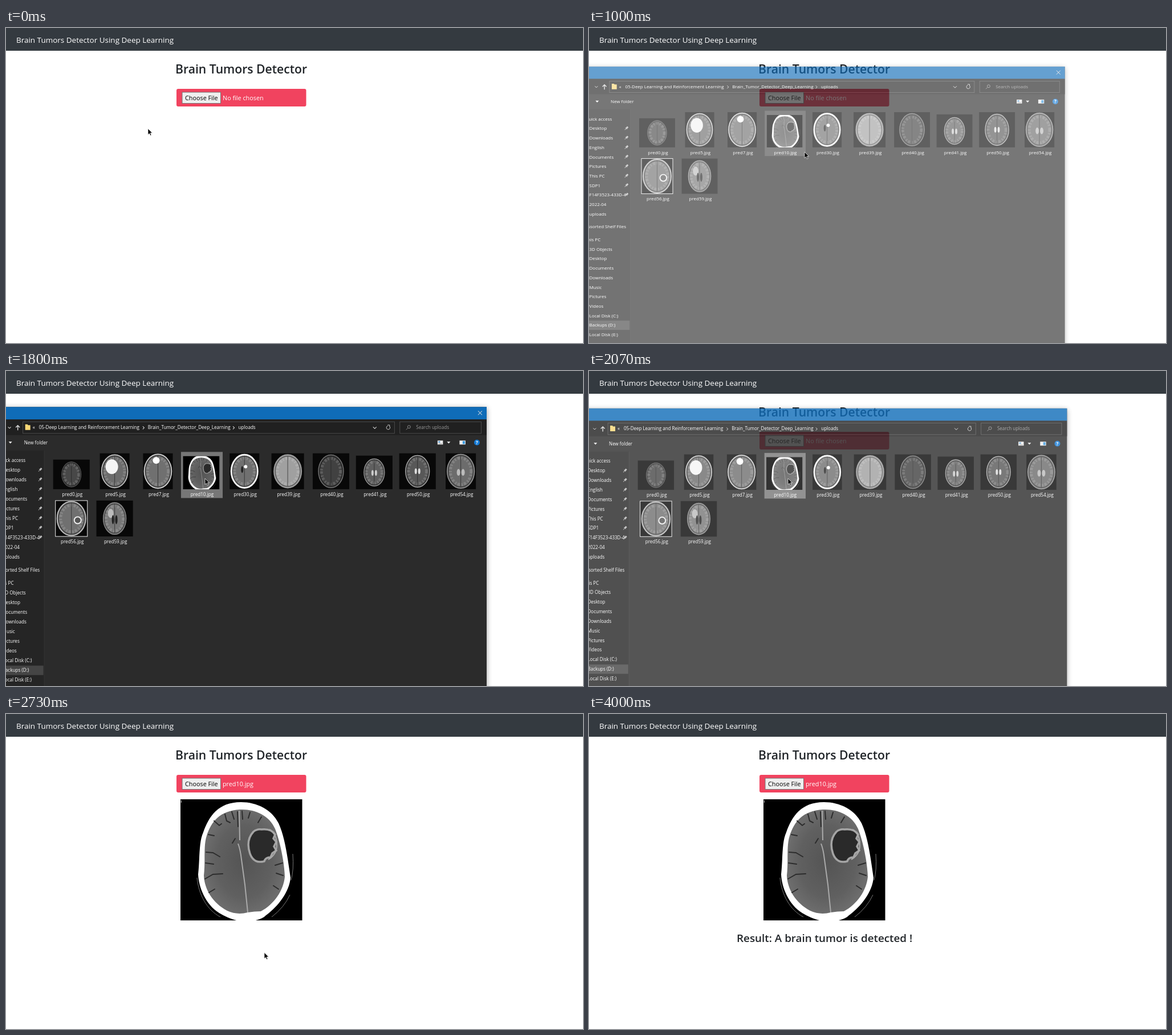
Recreate the animation shown at these times as an HTML page. Size 1012 px wide and 554 px high, loop 4.47 s.

```html
<!DOCTYPE html>
<html lang="en">
<head>
<meta charset="utf-8">
<title>Brain Tumors Detector</title>
<style>
html, body { margin: 0; width: 100%; height: 100%; overflow: hidden; background: #fff; }
svg { display: block; width: 100%; height: 100%; font-family: "Open Sans", "Noto Sans", sans-serif; }
#dialog { font-size: 8.1px; fill: #fff; filter: drop-shadow(0 2px 5px #0006); }
.line { fill: none; stroke: #ddd; }
</style>
</head>
<body>
<svg id="stage" viewBox="0 0 1012 554">
  <defs>
    <radialGradient id="tissue">
      <stop offset="0" stop-color="#545454"/>
      <stop offset=".7" stop-color="#606060"/>
      <stop offset="1" stop-color="#6c6c6c"/>
    </radialGradient>
    <symbol id="scan" viewBox="306 150 213.5 213" preserveAspectRatio="xMidYMid slice">
      <path fill="#000" d="M306 150h214v213H306z"/>
      <path class="line" style="stroke:#777" d="M335 288C338 318 352 344 376 357M503 246Q505 275 500 292M498 318Q488 340 466 357"/>
      <path fill="#fff" d="M412 155C440 155 466 168 478 192C490 218 494 255 499 288C497 312 478 338 456 354Q448 363 420 366Q395 363 374 350C350 335 338 305 337 282C340 255 338 225 346 208C356 180 372 155 412 155Z"/>
      <path fill="url(#tissue)" d="M411 168C436 167 462 178 472 202C482 228 488 262 489 286C487 310 470 335 447 347Q436 347 424 349Q405 354 388 346C362 332 348 308 347 284C350 258 346 232 352 214C360 190 374 170 411 168Z"/>
      <path fill="none" stroke="#2c2c2c" stroke-width="2" stroke-linecap="round" d="M365 188l9 8 4-3M384 176l3 12 6 3M396 172l4 13M406 172l1 26M414 171l1 14M428 173l-3 10M448 181l-6 10M355 212l10 2M351 243l12 1 12 7M350 262l14 2M349 290l14-8 17-1M356 314l10-6M485 262l-13 4M486 284l-12-4M478 308l-9-6M402 219l-5 8"/>
      <path fill="none" stroke="#aaa" stroke-width="2" d="M409 170L410 222M407 228Q411 238 413 256L419 300 424 349"/>
      <path fill="#2a2a2a" stroke="#a4a4a4" stroke-width="3.5" d="M448 203Q465 201 472 212L469 219 474 225 470 233 474 240 467 245 464 252Q455 252 453 259Q435 264 428 246Q420 222 434 207Q440 202 448 203Z"/>
      <path fill="none" stroke="#aaa" stroke-width="2" d="M462 203Q475 210 475 231Q475 247 460 256"/>
      <path fill="#bbb" d="M307 152h1v4h-1z"/>
    </symbol>
  </defs>

  <path fill="#343a40" d="M0 0H1012V40H0z"/>
  <text x="18" y="25.5" font-size="13.47" fill="#fff">Brain Tumors Detector Using Deep Learning</text>
  <text x="297" y="79.5" font-size="21.15" font-weight="600" fill="#212529">Brain Tumors Detector</text>
  <rect id="upload" x="299" y="107" width="227.5" height="31" rx="3"/>
  <rect x="309" y="113" width="67.5" height="19.5" fill="#efefef" stroke="#767676"/>
  <text x="314" y="127" font-size="10.8">Choose File</text>
  <text id="file" x="380" y="127" font-size="10.8" fill="#fff"></text>

  <use id="preview" href="#scan" x="306" y="150" width="213.5" height="213"/>
  <g id="predict">
    <rect x="377" y="380" width="71" height="34" rx="3"/>
    <text x="389" y="403" font-size="13.45" fill="#fff">Predict!</text>
  </g>
  <text id="result" x="259" y="400.5" font-size="18.85" font-weight="600" fill="#212529">Result: A brain tumor is detected !</text>

  <g id="dialog"></g>
  <path id="cursor" d="M0 0V10.7L2.5 8.4 4.2 12.2 6 11.4 4.3 7.7H7.7Z" stroke="#fff" stroke-width=".7"/>
</svg>
<script>
const $ = id => document.getElementById(id);
const FPS = 15, LOOP = 4470;

const box = (x, y, w, h, fill, more = '') =>
  `<rect x="${x}" y="${y}" width="${w}" height="${h}" fill="${fill}" ${more}/>`;
const text = (x, y, str, more = '') => `<text x="${x}" y="${y + 3}" ${more}>${str}</text>`;
const line = (d, more = '') => `<path class="line" d="${d}" ${more}/>`;
const oval = (x, y, rx, ry, fill, more = '') =>
  `<ellipse cx="${x}" cy="${y}" rx="${rx}" ry="${ry}" fill="${fill}" ${more}/>`;

// label number, picture width and height, head radii, skull colour and width, tissue, extra marks
const thumbs = [
  [0, 64, 52, 17, 22, '#555', 1, '#484848'],
  [5, 52, 63, 23, 29, '#ccc', 1.5, '#6c6c6c', oval(-5, -8, 11, 13, '#f4f4f4')],
  [7, 52, 63, 24, 30, '#ddd', 1.5, '#707070', oval(-3, -19, 6, 6, '#fff')],
  [10, 64, 58],
  [30, 52, 63, 23, 29, '#f4f4f4', 3, '#707070', oval(-4, -3, 2, 6, '#222') + oval(2, -8, 3, 3, '#fff')],
  [39, 57, 63, 24, 29, '#999', 2, '#a0a0a0'],
  [40, 64, 63, 22, 29, '#777', 1.3, '#414141'],
  [41, 64, 59, 18, 24, '#999', 1.3, '#606060', oval(-3, 1, 2, 5, '#ccc') + oval(3, 1, 2, 5, '#ccc')],
  [50, 64, 63, 21, 28, '#aaa', 1.3, '#585858', oval(-3, 0, 2, 5, '#ddd') + oval(3, 0, 2, 5, '#ddd')],
  [54, 53, 63, 24, 30, '#999', 1.3, '#6c6c6c', oval(-4, 2, 3, 6, '#bbb') + oval(4, 2, 3, 6, '#bbb')],
  [56, 56, 63, 25, 30, '#bbb', 2, '#707070', oval(11, 3, 6, 6, '#555', 'stroke="#eee" stroke-width="2"')],
  [59, 64, 63, 20, 28, '#888', 1.3, '#777', oval(-7, -9, 5, 8, '#bbb') + oval(-3, 2, 2, 8, '#222') + oval(3, 2, 2, 8, '#222')]
];

function thumbnail([num, w, h, rx, ry, skull, skullWidth, tissue, marks = ''], i) {
  const cx = 115 + 75.8 * (i % 10), bottom = i < 10 ? 208 : 291;
  const label = text(cx + 1.5, bottom + 9, `pred${num}.jpg`, 'text-anchor="middle"');
  if (!rx) return `<use href="#scan" x="${cx - w / 2}" y="${bottom - h}" width="${w}" height="${h}"/>` + label;
  const frame = num == 56 ? 'stroke="#eee"' : '';
  return `<g transform="translate(${cx} ${bottom - h / 2})">` +
    box(-w / 2, -h / 2, w, h, '#080808', frame) +
    oval(0, 0, rx, ry, tissue, `stroke="${skull}" stroke-width="${skullWidth}"`) +
    oval(0, 0, rx * .91, ry * .92, 'none', 'stroke="#000" stroke-opacity=".45" stroke-width="1.5"') +
    oval(0, 0, rx * .76, ry * .78, 'none', 'stroke="#fff" stroke-opacity=".15" stroke-width="5" stroke-dasharray="4 2 2.5 3"') +
    line(`M0 ${-ry * .9}V${ry * .9}`, 'style="stroke:#222;stroke-width:.7"') + marks + '</g>' + label;
}

// a leading * marks a top level entry, a trailing ^ a pinned one
const places = [
  [157, '*Quick access,Desktop^,Downloads^,English^,Documents^,Pictures^,This PC^,SDP1^,F14F3523-433D-4^,2022-04,uploads'],
  [350, '*Assorted Shelf Files'],
  [373, '*This PC,3D Objects,Desktop,Documents,Downloads,Music,Pictures,Videos,Local Disk (C:),Backups (D:),Local Disk (E:)']
];
const pin = y => `<path transform="translate(60 ${y}) rotate(45)" fill="#bbb" d="M-1.5-4h3v3.5l1 1h-2.1V4h-.8V.5h-2.1l1-1z"/>`;
const sidebar = places.map(([top, names]) => names.split(',').map((name, i) => {
  const y = top + 17 * i;
  return text(name[0] == '*' ? -13.5 : -6, y, name.replace(/[*^]/g, '')) + (name.endsWith('^') ? pin(y) : '');
}).join('')).join('');

$('dialog').innerHTML =
  box(-85, 63.5, 927.5, 540, '#2b2b2b') +
  box(-85, 63.5, 927.5, 22, '#0f6cb8') +
  box(-85, 85.5, 927.5, 27.5, '#202020') +
  box(-85, 140, 152, 464, '#252525') +
  box(67, 140, 1, 464, '#333') +
  box(-85, 518, 151, 16.5, '#454545') +
  line('M827.5 70.5l7 7M834.5 70.5l-7 7', 'id="close"') +
  box(30, 89.5, 651, 20.5, 'none', 'stroke="#555" stroke-width=".8"') +
  box(690.5, 89.5, 142.5, 20.5, 'none', 'stroke="#555" stroke-width=".8"') +
  line('M4 98.5l2.5 2.5 2.5-2.5M240 97.5l2.5 2.5-2.5 2.5M398 97.5l2.5 2.5-2.5 2.5M643.5 98.5l3 3 3-3') +
  line('M21 104.5v-8M17.5 99.5l3.5-3.5 3.5 3.5', 'stroke-width="1.4"') +
  line('M672.5 97.7a3.2 3.2 0 1 1-3-1M669 95.2h3.5v3', 'stroke-width=".9"') +
  line('M701.5 103.5l2.8-2.8M709 98.5a2.5 2.5 0 1 1-5 0 2.5 2.5 0 1 1 5 0', 'style="stroke:#999;stroke-width:.9"') +
  '<path fill="#f8d775" d="M34 94h4l1 1.5h4V104h-9z"/>' +
  text(47, 99, '«') +
  text(58, 99.5, '05-Deep Learning and Reinforcement Learning') +
  text(249, 99.5, 'Brain_Tumor_Detector_Deep_Learning') +
  text(407.5, 99.5, 'uploads') +
  text(719, 99.5, 'Search uploads', 'fill="#999"') +
  text(32, 126, 'New folder') +
  '<path d="M5 124.5h6l-3 3.2zM773 124.5h6l-3 3.2z"/>' +
  box(756.5, 122.5, 9.5, 7, '#eee') + box(758, 124, 3, 2, '#3b8ed0') + line('M758 128h6.5', 'style="stroke:#888;stroke-width:.8"') +
  box(795, 122.5, 10.5, 7, '#eee') + box(800.5, 123.5, 4, 5, '#3b9be0') +
  oval(825.5, 126, 5, 5, '#1479d4') + text(825.5, 126, '?', 'text-anchor="middle" font-weight="700"') +
  box(307, 142.5, 73, 81, 'none', 'id="picked"') +
  thumbs.map(thumbnail).join('') + sidebar;

// keys: [frame, value, ...]; linear in between
function along(keys, f) {
  const n = keys.findIndex(k => k[0] > f);
  if (n < 1) return keys.at(n).slice(1);
  const a = keys[n - 1], b = keys[n], p = (f - a[0]) / (b[0] - a[0]);
  return a.slice(1).map((v, i) => v + (b[i + 1] - v) * p);
}
const pointer = [[0, 249, 177], [8, 338, 126], [11, 345, 124], [13, 350, 130], [15, 378, 218], [17, 316, 254],
  [24, 349, 189], [31, 349, 189], [33, 401, 240], [38, 412, 397], [40, 412, 397], [45, 617, 510], [58, 617, 510], [59, 18, 511]];
const fade = [[13, 0], [14, .35], [15, .64], [16, .88], [17, .98], [18, 1], [30, 1], [31, .8], [32, .3], [33, 0]];

const show = (id, on) => $(id).setAttribute('visibility', on ? 'visible' : 'hidden');
const fill = (id, color) => $(id).setAttribute('fill', color);

function draw(now) {
  const f = Math.floor((now % LOOP + 5) * FPS / 1000);
  const [x, y] = along(pointer, f), [alpha] = along(fade, f);

  $('cursor').setAttribute('transform', `translate(${x} ${y})`);
  show('cursor', f < 60);

  const scale = 1.001 * (.95 + .05 * alpha);
  $('dialog').setAttribute('opacity', alpha);
  $('dialog').setAttribute('transform', `translate(379 322) scale(${scale}) translate(-379 -322)`);
  show('dialog', alpha > 0);
  show('close', alpha > 0 && f < 31);
  const hovered = x > 307 && x < 380 && y > 142 && y < 223;
  fill('picked', f >= 27 ? '#777' : hovered ? '#4d4d4d' : 'none');

  const loaded = f >= 33;
  fill('upload', f >= 6 && f <= 33 ? '#e23c5a' : '#f1435f');
  $('file').textContent = loaded ? 'pred10.jpg' : 'No file chosen';
  show('preview', loaded);
  show('predict', loaded && f < 40);
  fill('predict', y > 380 ? '#138496' : '#2ba1b7');

  const p = Math.min(1, Math.max(0, (f - 43.5) / 9));
  $('result').setAttribute('opacity', .5 - Math.cos(p * Math.PI) / 2);
  requestAnimationFrame(draw);
}
requestAnimationFrame(draw);
</script>
</body>
</html>
```
